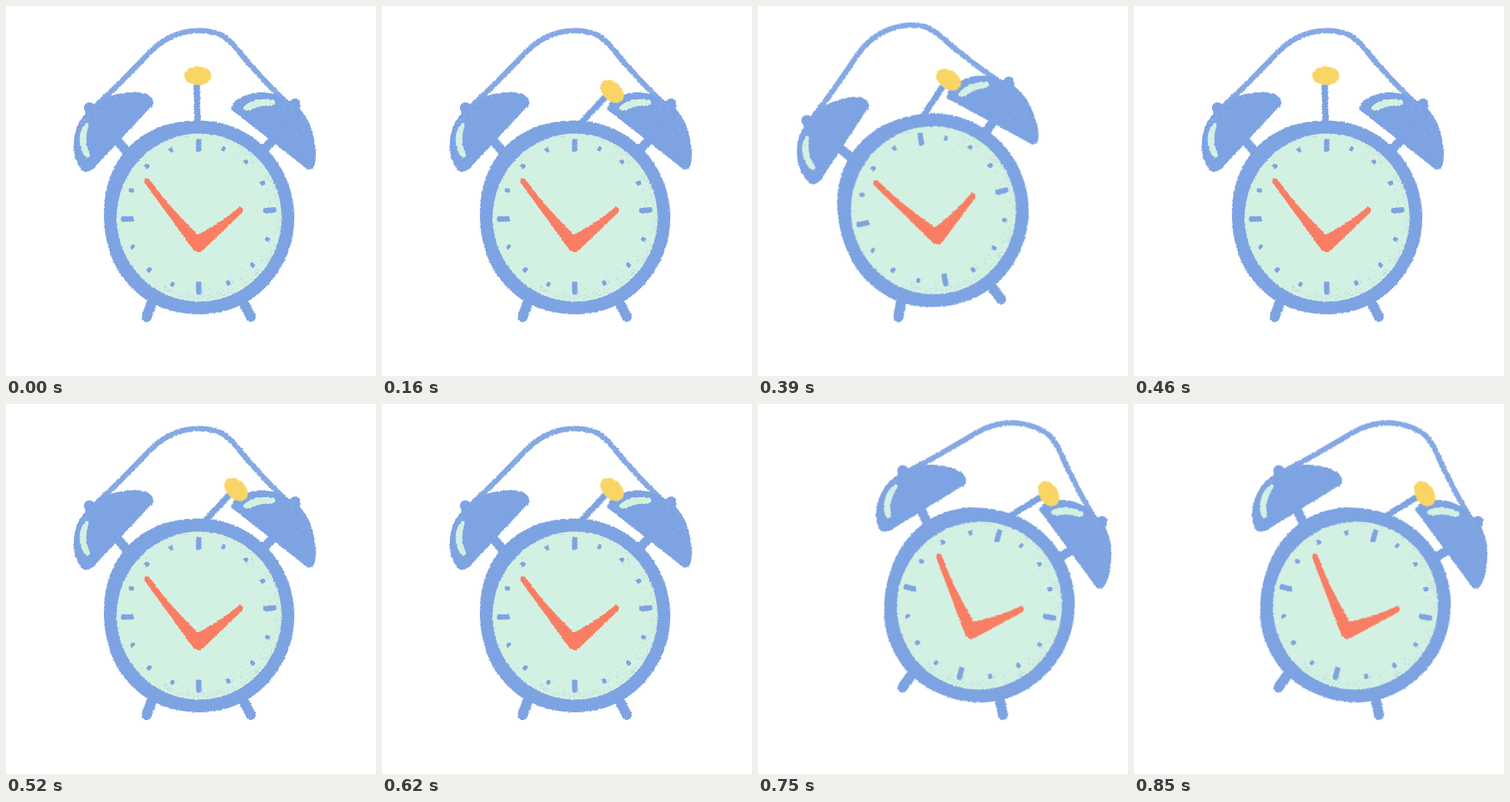
These frames come from a looping animation (480 by 480 pixels, 0.92 s). An HTML page:

```html
<!DOCTYPE html>
<html lang="en">
<head>
<meta charset="utf-8">
<title>Ringing alarm clock</title>
<style>
  html, body { margin: 0; width: 100%; height: 100%; overflow: hidden; background: #fff; }
  svg { display: block; width: 100vw; height: 100vh; }
  .blue { fill: #7da3e2; }
  .mint { fill: #d3f1e2; }
  .line { fill: none; stroke: #7da3e2; stroke-linecap: round; }
  .grain { fill: none; stroke-linecap: round; stroke-width: 1; }
</style>
</head>
<body>
<svg viewBox="0 0 480 480">
  <defs>
    <filter id="crayon" filterUnits="userSpaceOnUse" x="60" y="10" width="370" height="420" color-interpolation-filters="sRGB">
      <feTurbulence type="fractalNoise" baseFrequency="0.35" numOctaves="2" seed="4"/>
      <feDisplacementMap in="SourceGraphic" scale="3" xChannelSelector="R" yChannelSelector="G"/>
      <feGaussianBlur stdDeviation="0.4"/>
    </filter>
  </defs>
  <g id="clock">
    <g filter="url(#crayon)">
      <path class="line" stroke-width="7" style="stroke:#85a9e4" d="M120 126C150 100 170 76 191 56C211 37 232 32 250 32C272 32 284 37 298 54C318 79 340 102 362 124"/>
      <path class="line" stroke-width="13" d="M190 382L182.500 403.500M307 382L317.500 403.500"/>
      <path class="line" stroke-width="12" d="M160 193L143 173M332 189L349 171"/>

      <circle class="blue" cx="108" cy="132" r="7"/>
      <path class="blue" d="M191 124C188 109 160 110 141 115C112 122 89 148 88 178C87 196 95 213 102 215Q109 217 118 206L186 133Q192 129 191 124Z"/>
      <path class="mint" d="M104 152C93 162 93 182 103 196Q108 199 109 193C103 181 103 168 107 156Q107 151 104 152Z"/>

      <circle class="blue" cx="375" cy="127" r="7"/>
      <path class="blue" d="M293 132C294 120 316 112 333 112C361 113 385 131 394 153C402 174 404 196 400 207Q397 214 390 211L297 138Q292 136 293 132Z"/>
      <path class="mint" d="M308 131C318 121 334 119 348 122Q351 126 346 129Q329 128 314 136Q306 136 308 131Z"/>

      <path class="blue" d="M250 148.500C319 148.500 374 205 374 275C374 344 319 400 252 400C174 400 127 344 127 270C127 197 175 148.500 250 148.500Z"/>
      <ellipse class="mint" cx="250.500" cy="274.500" rx="107" ry="109"/>
      <g id="ticks" class="blue"></g>
      <path fill="#fa7e64" stroke="#fa7e64" stroke-width="2" stroke-linejoin="round" d="M181 229Q179 223 185 225Q213 264 249 298Q278 283 303 262Q308 262 306 267L257 314Q250 321 244 316Z"/>
    </g>
    <g id="grain"></g>
    <g id="hammer">
      <g filter="url(#crayon)">
        <path class="line" stroke-width="8" d="M248.500 155L247.500 100"/>
        <ellipse fill="#f9d566" cx="249" cy="90.500" rx="17.500" ry="12"/>
      </g>
    </g>
  </g>
</svg>
<script>
const NS = 'http://www.w3.org/2000/svg';
const BEAT = 230;          // one ring, in ms
const STRIKE = 44;         // hammer angle at a bell
const CX = 250, CY = 273.5;
const get = id => document.getElementById(id);
const rad = deg => deg * Math.PI / 180;

function add(parent, tag, attrs) {
  const el = document.createElementNS(NS, tag);
  for (const k in attrs) el.setAttribute(k, attrs[k]);
  parent.append(el);
}

let seed = 11;
const rnd = () => (seed = seed * 16807 % 2147483647) / 2147483647;

// Sixteen hand-placed ticks: the ones on the right sit a little too early
for (let i = 0; i < 16; i++) {
  const major = i % 4 === 0;
  const even = i * 22.5;
  const a = even - 7 * Math.abs(Math.sin(rad(even))) * (1 - i / 16);
  const r = major ? 92.5 : 94;
  const w = major ? 7 : 5 + rnd(), h = major ? 17 : 6 + rnd();
  const x = CX + r * Math.sin(rad(a)), y = CY - r * Math.cos(rad(a));
  add(get('ticks'), 'rect', {
    x: x - w / 2, y: y - h / 2, width: w, height: h, rx: 2,
    transform: `rotate(${a} ${x} ${y})`
  });
}

// Short chalk marks in a ring sector, denser towards the outer radius
function grain(count, cx, cy, r0, r1, from, to, color, opacity) {
  let d = '';
  for (let i = 0; i < count; i++) {
    const a = rad(from + (to - from) * rnd());
    const r = r1 + (r0 - r1) * rnd() * rnd();
    const x = cx + r * Math.cos(a), y = cy + r * Math.sin(a);
    d += `M${x.toFixed(1)} ${y.toFixed(1)}l${(rnd() * 1.6).toFixed(1)} ${(-rnd()).toFixed(1)}`;
  }
  add(get('grain'), 'path', { d, class: 'grain', stroke: color, opacity });
}
grain(220, CX, CY, 86, 107, -60, 125, '#7da3e2', 0.35);
grain(40, CX, CY, 100, 107, 125, 300, '#7da3e2', 0.3);
grain(50, 148, 172, 30, 56, 190, 285, '#a5c0ec', 0.5);
grain(50, 346, 172, 25, 50, -75, 10, '#a5c0ec', 0.5);

const turn = (deg, x, y) =>
  `translate(${x}px, ${y}px) rotate(${deg}deg) translate(${-x}px, ${-y}px)`;

// Holds each pose from its start time until the next one begins
function play(id, poses, starts, duration) {
  const frames = poses.map((transform, i) =>
    ({ offset: starts[i] / duration, transform, easing: 'step-end' }));
  frames.push({ offset: 1, transform: poses[0] });
  get(id).animate(frames, { duration, iterations: Infinity }).startTime = 0;
}

// The clock hops upright, onto its left foot, upright, onto its right foot
const upright = turn(0, 183, 405);
const hops = [upright, turn(-9.7, 183, 405), upright, turn(15.4, 317, 404)];
play('clock', hops, hops.map((_, i) => i * BEAT), hops.length * BEAT);

// The hammer starts centred, then strikes left and right in turn
const strikes = [0, 30, 60, 90, 160];
const swing = i => turn(i && STRIKE * (-1) ** i, 248.5, 162);
play('hammer', strikes.map((_, i) => swing(i)), strikes, BEAT);
</script>
</body>
</html>
```
